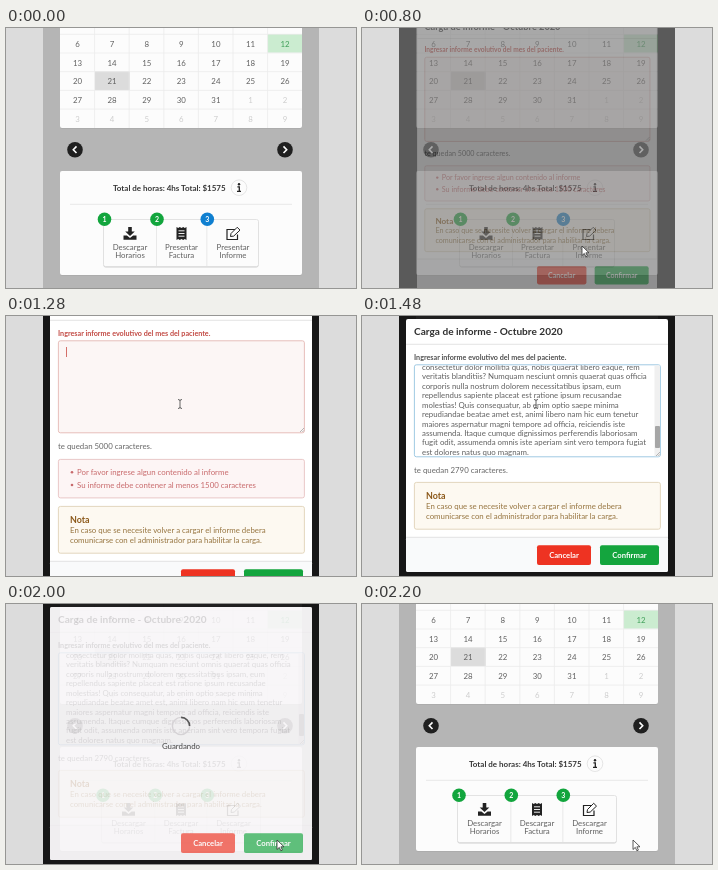
Animation, 350 px wide and 260 px high, one loop 2240 ms. Source, as an HTML page:

```html
<!DOCTYPE html>
<html lang="es">
<head>
<meta charset="utf-8">
<title>Carga de informe</title>
<style>
  html, body { margin: 0; width: 100%; height: 100%; overflow: hidden; background: #dcdcdc; }
  svg { display: block; width: 100%; height: 100%; }
  text { font: 7.85px Lato, sans-serif; white-space: pre; }
  .bold { font-weight: 700; }
  .mid { text-anchor: middle; }
</style>
</head>
<body>
<svg id="stage" viewBox="0 0 350 260"></svg>
<script>
const LOOP = 2240;
const stage = document.getElementById('stage');

const text = (x, y, s, fill = '#555', cls = '', size = 7.85) =>
  `<text x="${x}" y="${y}" fill="${fill}" class="${cls}" style="font-size:${size}px">${s}</text>`;
const rect = (x, y, w, h, fill, extra = '') =>
  `<rect x="${x}" y="${y}" width="${w}" height="${h}" fill="${fill}" ${extra}/>`;
const line = (d, stroke, width = 1, extra = '') =>
  `<path d="${d}" fill="none" stroke="${stroke}" stroke-width="${width}" ${extra}/>`;
const group = (id, content, extra = '') => `<g id="${id}" ${extra}>${content}</g>`;
const card = (y, h) =>
  rect(54, y + .7, 242, h, '#9e9e9e', 'rx="2" opacity=".5"') + rect(54, y, 242, h, '#fcfcfc', 'rx="2"');

function calendar() {
  const edge = col => 54 + col * 34.6;
  let out = card(-10, 110) + rect(261.6, 6, 34.4, 18.7, '#cbecd0') + rect(89, 43.3, 35, 18.7, '#dcdcdc');
  for (let row = 0; row < 5; row++) {
    out += line(`M54 ${6.3 + row * 18.7}H296`, '#ebebeb', .8);
    for (let col = 0; col < 7; col++) {
      const n = 6 + row * 7 + col;
      const fill = n === 12 ? '#3f9f58' : n > 31 ? '#cdcdcd' : '#606060';
      out += text(edge(col) + 17.5, 18.8 + row * 18.7, n > 31 ? n - 31 : n, fill, 'mid');
    }
  }
  for (let col = 1; col < 7; col++) out += line(`M${edge(col)} 0V100`, '#ebebeb', .8);
  return out + group('strike', line('M274 16.2H285', '#3f9f58', .8));
}

const arrow = (x, dir) => `<circle cx="${x}" cy="121.7" r="7.8" fill="#202020"/>` +
  line(`M${x - 1.5 * dir} 118.4l${3.2 * dir} 3.3l${-3.2 * dir} 3.3`, '#fff', 1.6);

const icons = [
  '<path d="M-1.8-6.5h3.6v4.5h3L0 2.6-4.8-2h3z" fill="#222"/>' +
    '<path d="M-6.5 2h3.4L0 4.5 3.1 2h3.4v4.3h-13z" fill="#222"/>',
  '<path d="M-5-6.5l1.7 1 1.6-1 1.7 1 1.7-1 1.6 1 1.7-1v13l-1.7-1-1.6 1-1.7-1-1.7 1-1.6-1-1.7 1z" fill="#222"/>' +
    line('M-3-2.7h6M-3 0h6M-3 2.7h6', '#fff', .9),
  line('M2.5-4H-6V6H4.5V1', '#222', 1.2) +
    '<path d="M-2.5 3l.5-3L4.2-6.2 7-3.4.7 2.6z" fill="#fff" stroke="#222"/>'
];

function steps(done) {
  const left = done ? 95.5 : 97.5, width = done ? 159 : 155;
  const centers = done ? [122.5, 175, 227.5] : [124, 175.5, 227];
  const badges = done ? [97, 149.3, 201.3] : [98.5, 151, 201.3];
  const verbs = done ? ['Descargar', 'Descargar', 'Descargar'] : ['Descargar', 'Presentar', 'Presentar'];
  const nouns = ['Horarios', 'Factura', 'Informe'];
  let out = rect(left, 192, width, 47.5, '#cfcfcf', 'rx="2"') +
    rect(left, 191.5, width, 47, '#fcfcfc', 'rx="2" stroke="#dedede" stroke-width=".8"');
  for (const i of [1, 2]) out += line(`M${badges[i] - .5} 192V238`, '#e4e4e4', .8);
  centers.forEach((x, i) => {
    out += `<g transform="translate(${x} 205.5)">${icons[i]}</g>` +
      text(x, 222, verbs[i], '#606060', 'mid') + text(x, 230.2, nouns[i], '#606060', 'mid') +
      `<circle cx="${badges[i]}" cy="191.3" r="6.8" fill="${i === 2 && !done ? '#0f7fd0' : '#12a53d'}"/>` +
      text(badges[i], 193.8, i + 1, '#fff', 'mid bold', 7);
  });
  return out;
}

const page = rect(37, 0, 276, 260, '#b5b5b5') + calendar() + arrow(69, -1) + arrow(279, 1) +
  card(143, 104) + text(107, 162.8, 'Total de horas: 4hs Total: $1575', '#383838', 'bold', 8) +
  '<circle cx="233" cy="159.7" r="7.8" fill="#fcfcfc" stroke="#dfdfdf" stroke-width=".8"/>' +
  '<circle cx="233" cy="156.3" r="1.2" fill="#222"/>' +
  line('M231.4 158.8H233.3V163M231 163.3H235', '#222', 1.3) +
  line('M64 176.3H286', '#e4e4e4', .8) +
  group('todo', steps(false)) + group('done', steps(true));

const report = [
  'consectetur dolor mollitia quas, nobis quaerat libero eaque, rem',
  'veritatis blanditiis? Numquam nesciunt omnis quaerat quas officia',
  'corporis nulla nostrum dolorem necessitatibus ipsam, eum',
  'repellendus sapiente placeat est ratione ipsum recusandae',
  'molestias! Quis consequatur, ab enim optio saepe minima',
  'repudiandae beatae amet est, animi libero nam hic eum tenetur',
  'maiores aspernatur magni tempore ad officia, reiciendis iste',
  'assumenda. Itaque cumque dignissimos perferendis laboriosam',
  'fugit odit, assumenda omnis iste aperiam sint vero tempora fugiat',
  'est dolores natus quo magnam.'
];

const button = (x, w, fill, label) => rect(x, 229.3, w, 19.7, fill, 'rx="2"') +
  text(x + w / 2, 242, label, '#fff', 'mid bold', 7.7);
const buttons = button(175, 54, '#ee3322', 'Cancelar') + button(238, 59, '#14a53e', 'Confirmar');

const errors = rect(52.4, 167.4, 246, 38.5, '#fdf5f5', 'rx="2" stroke="#e5bcbc" stroke-width=".8"') +
  ['Por favor ingrese algun contenido al informe', 'Su informe debe contener al menos 1500 caracteres']
    .map((s, i) => `<circle cx="66" cy="${180.3 + i * 12.7}" r="1.3" fill="#c86a6c"/>` +
      text(71, 183 + i * 12.7, s, '#c86a6c')).join('');

const lower = rect(44, 221.3, 262, 34.7, '#f9fafb', 'rx="2"') + line('M44 221.3H306', '#dedede', .8) +
  rect(52.4, 166.4, 246, 46.8, '#fdf9f1', 'rx="2" stroke="#dccdaf" stroke-width=".8"') +
  text(64, 182.5, 'Nota', '#8a5717', 'bold', 8.9) +
  text(64, 192.8, 'En caso que se necesite volver a cargar el informe debera', '#96743f') +
  text(64, 203.3, 'comunicarse con el administrador para habilitar la carga.', '#96743f') + buttons;

const modal = '<rect id="sheet" x="44" y="3" width="262" height="253" rx="2" fill="#fff"/>' +
  text(52, 18.8, 'Carga de informe - Octubre 2020', '#303030', 'bold', 10.1) +
  line('M44 28.3H306', '#dedede', .8) +
  group('label', text(52, 43.5, 'Ingresar informe evolutivo del mes del paciente.', 'currentColor', 'bold', 7.2)) +
  '<rect id="area" x="52.4" y="48.8" width="246" height="92" rx="2"/>' +
  group('caret', line('M60.5 55V65', '#d0605a', .9)) +
  group('report', report.map((s, i) => text(60, 53.8 + i * 9.45, s, '#606060')).join('') +
    rect(292.5, 49.3, 5.5, 91, '#f0f0f0') + rect(293, 110, 5, 22, '#a6a6a6', 'rx="1"'), 'clip-path="url(#areaClip)"') +
  line('M294 140l4-4M296.3 140l1.7-1.7', '#999', .7) +
  '<text id="left" x="52" y="157" fill="#666"></text>' +
  group('errors', errors) + group('lower', lower) +
  group('saving', rect(44, 3, 262, 253, '#f7f4f7', 'rx="2" opacity=".82"') +
    '<g opacity=".1" clip-path="url(#sheetClip)"><use href="#page"/></g>' +
    `<g opacity=".6">${buttons}</g>` +
    '<circle cx="175" cy="122" r="8.6" fill="none" stroke="#d5d2d5" stroke-width="1.4"/>' +
    group('spin', line('M175 113.4A8.6 8.6 0 0 1 183.6 122', '#555', 1.6)) +
    text(175, 144.7, 'Guardando', '#444', 'mid'));

stage.innerHTML = `<defs>
  <clipPath id="areaClip">${rect(52.8, 49.2, 245.2, 91.2, '#000')}</clipPath>
  <clipPath id="sheetClip">${rect(44, 3, 262, 253, '#000')}</clipPath>
  <clipPath id="pageClip">${rect(37, 0, 276, 260, '#000')}</clipPath></defs>` +
  rect(0, 0, 350, 260, '#dcdcdc') +
  group('page', page) +
  group('dimmer', rect(37, 0, 276, 260, '#000')) +
  `<g clip-path="url(#pageClip)">${group('modal', modal)}</g>` +
  group('pointer', '<path d="M0 0V9.5L2.3 7.4 3.9 10.8 5.4 10.1 3.9 6.8H7z" fill="#fff" stroke="#333" stroke-width=".8"/>') +
  group('beam', line('M-2-4.5Q0-4.5 0-3.2Q0-4.5 2-4.5M0-3.5V3.5M-2 4.5Q0 4.5 0 3.2Q0 4.5 2 4.5', '#555', .9));

const el = {};
stage.querySelectorAll('[id]').forEach(node => el[node.id] = node);
const set = (id, attrs) => Object.entries(attrs).forEach(([k, v]) => el[id].setAttribute(k, v));
const show = (id, on) => set(id, { display: on ? 'inline' : 'none' });
const ramp = (t, a, b) => Math.min(1, Math.max(0, (t - a) / (b - a)));
const smooth = x => x * x * (3 - 2 * x);

// time, x, y
const path = [[0, 122, 133], [400, 122, 133], [660, 220, 218], [960, 220, 218],
  [1240, 174, 88], [1500, 174, 88], [1720, 271, 236], [LOOP, 271, 236]];

function pointerAt(t) {
  const i = path.findIndex(k => k[0] > t);
  const [a, b] = [path[i - 1], path[i]];
  const u = smooth(ramp(t, a[0], b[0]));
  return [a[1] + (b[1] - a[1]) * u, a[2] + (b[2] - a[2]) * u];
}

function render(t) {
  const closing = t >= 2040;
  const open = closing ? 1 - ramp(t, 2040, 2195) : ramp(t, 680, 890);
  const invalid = t < 1400;
  const shift = invalid ? 48 : 0;

  show('strike', t >= 40 && t < 680);
  show('todo', t < 1900);
  show('done', t >= 1900);
  set('dimmer', { opacity: .87 * open });

  const scale = .8 + .2 * open, cy = closing ? 129.5 : 77;
  show('modal', open > 0);
  set('modal', {
    opacity: open * open,
    transform: `translate(175 ${cy}) scale(${scale}) translate(-175 ${-cy - shift / 2})`
  });
  set('sheet', { height: 253 + shift });
  set('lower', { transform: `translate(0 ${shift})` });
  set('label', { color: invalid ? '#c24a44' : '#505050' });
  set('area', {
    fill: invalid ? '#fcf6f5' : '#fff',
    stroke: invalid ? '#e5b8b4' : '#96c4e0',
    'stroke-width': .9
  });
  el.left.textContent = `te quedan ${invalid ? 5000 : 2790} caracteres.`;
  show('errors', invalid);
  show('report', !invalid);
  show('caret', invalid && t >= 1240);

  show('saving', t >= 1780);
  set('saving', { opacity: ramp(t, 1780, 1900) });
  set('spin', { transform: `rotate(${(t - 2000) * .6} 175 122)` });

  const [x, y] = pointerAt(t);
  const overArea = t > 1100 && t < 1640 && y > 30 && y < 141;
  show('pointer', t >= 80 && !overArea);
  show('beam', overArea);
  for (const id of ['pointer', 'beam']) set(id, { transform: `translate(${x} ${y})` });
}

const start = performance.now();
function tick() {
  render((performance.now() - start) % LOOP);
  requestAnimationFrame(tick);
}
tick();
</script>
</body>
</html>
```
